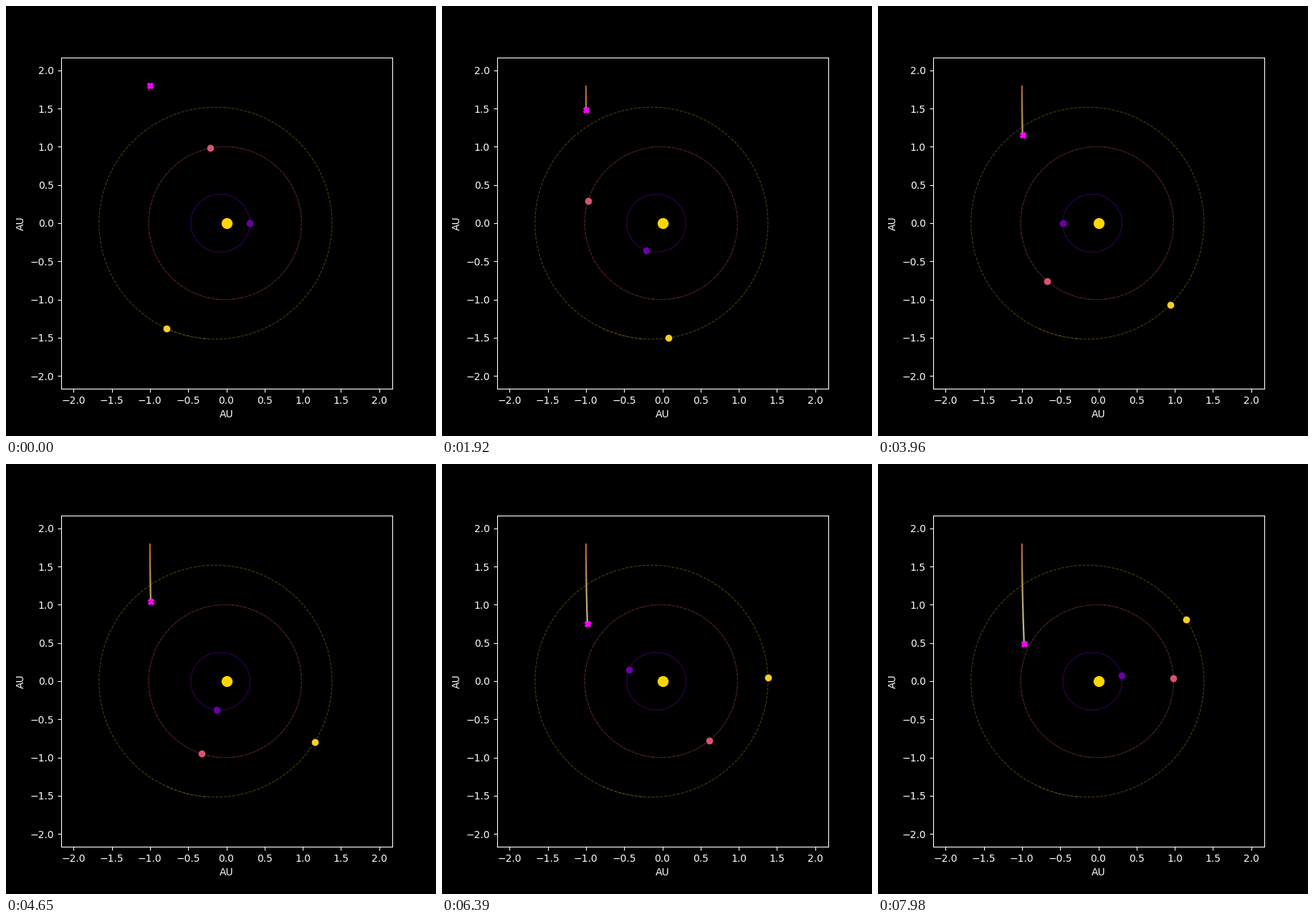
Write a matplotlib script that moves like this. It is 600x600 px and loops after 8000 ms.

```python
import numpy as np
import matplotlib.pyplot as plt
from matplotlib.animation import FuncAnimation
from matplotlib.collections import LineCollection

LOOP_MS = 8000
DAYS = 267          # one day passes per animation step
ORBIT_DAYS = 730

# semi-major axis (AU), eccentricity, period (days), mean anomaly at day 0 (deg)
PLANETS = [
    (0.387, 0.2056, 87.97, 0),
    (1.000, 0.0167, 365.25, 100),
    (1.524, 0.0934, 686.98, 250),
]


def kepler(a, e, period, m0, day):
    """Position on an ellipse with the sun at one focus."""
    mean = np.radians(m0) + 2 * np.pi * np.asarray(day) / period
    ecc = mean + e * np.sin(mean)
    for _ in range(8):
        ecc -= (ecc - e * np.sin(ecc) - mean) / (1 - e * np.cos(ecc))
    return a * (np.cos(ecc) - e), a * np.sqrt(1 - e * e) * np.sin(ecc)


plt.style.use("dark_background")
fig, ax = plt.subplots(figsize=(6, 6), dpi=100)
limit = 1.3 * 1.666
ax.set(xlim=(-limit, limit), ylim=(-limit, limit), xlabel="AU", ylabel="AU")
ax.set_aspect("equal")

days = np.arange(DAYS)
tracks, dots = [], []
for planet, shade in zip(PLANETS, np.linspace(0.2, 0.9, 3)):
    color = plt.cm.plasma(shade)
    orbit = kepler(*planet, np.arange(ORBIT_DAYS))
    ax.plot(*orbit, "--", color=color, lw=0.8, alpha=0.3)
    tracks.append(kepler(*planet, days))
    dots += ax.plot([], [], "o", color=color, ms=6)
ax.plot(0, 0, "o", color="gold", ms=10)

# probe: steady fall with a slight pull towards the sun
progress = days / (DAYS - 1)
probe = np.column_stack([-1 + 0.028 * progress ** 1.8, 1.8 - 1.308 * progress])
segments = np.stack([probe[:-1], probe[1:]], axis=1)
colors = plt.cm.RdYlBu(0.24 + 0.31 * progress[1:])
trail = ax.add_collection(LineCollection([], lw=1.5))
ship, = ax.plot([], [], "X", color="magenta", ms=6)


def update(day):
    for dot, (x, y) in zip(dots, tracks):
        dot.set_data([x[day]], [y[day]])
    trail.set_segments(segments[:day])
    trail.set_color(colors[:day])
    ship.set_data([probe[day, 0]], [probe[day, 1]])
    return [*dots, trail, ship]


anim = FuncAnimation(fig, update, frames=DAYS, interval=LOOP_MS / DAYS,
                     repeat=True, repeat_delay=0)
plt.show()
```
